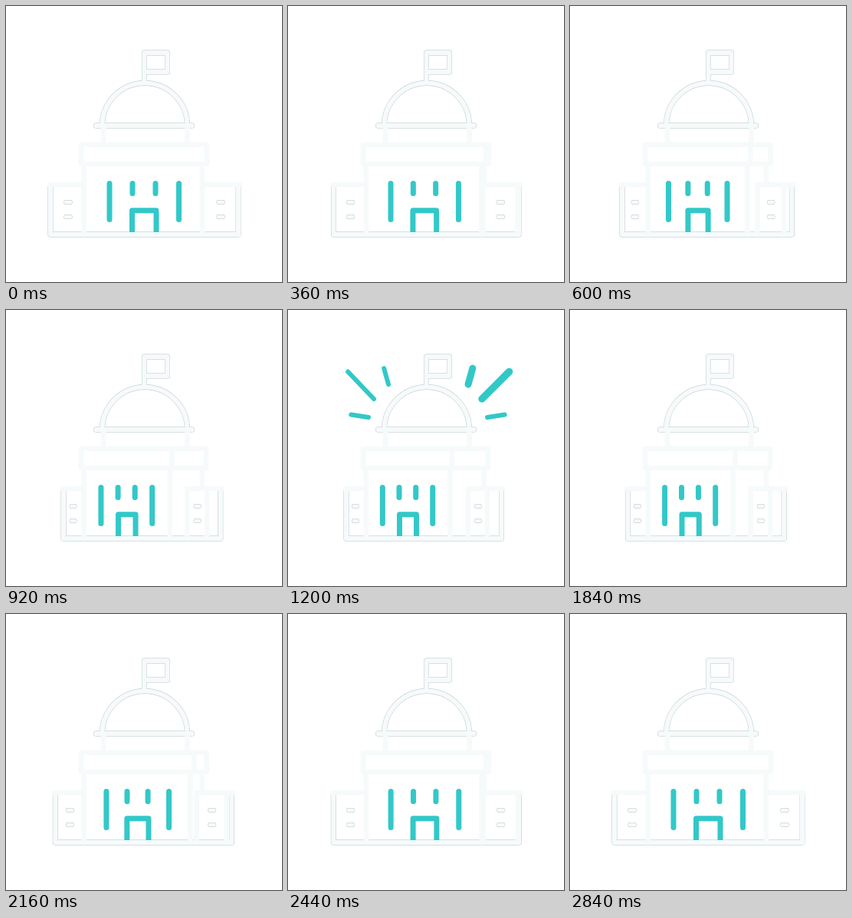
Write an HTML page with a canvas that moves like this. It is 360 px wide and 360 px high and loops after 3 s.

```html
<!DOCTYPE html>
<html lang="en">
<head>
<meta charset="utf-8">
<title>Turning capitol</title>
<style>
html, body { margin: 0; width: 100%; height: 100%; overflow: hidden; background: #fff; }
canvas { display: block; width: 100vmin; height: 100vmin; }
</style>
</head>
<body>
<canvas id="stage" width="360" height="360"></canvas>
<script>
const ctx = document.getElementById('stage').getContext('2d');
const LOOP = 3000;
const TEAL = '#33c8c8';
const PALE = '#f6fafb';
const EDGE = '#b4c0c4';
const BASE = 298;

const clamp = v => Math.max(0, Math.min(1, v));
const mix = (a, b, k) => a + (b - a) * k;
const progress = (t, start, end) => clamp((t - start) / (end - start));
const smooth = u => u * u * (3 - 2 * u);

// Bezier timing with flat ends: control points (x1, 0) and (x2, 1).
function ease(u, x1, x2) {
  let lo = 0, hi = 1;
  for (let i = 0; i < 22; i++) {
    const s = (lo + hi) / 2, r = 1 - s;
    if (3 * r * r * s * x1 + 3 * r * s * s * x2 + s ** 3 < u) lo = s;
    else hi = s;
  }
  return smooth((lo + hi) / 2);
}

function polyline(...points) {
  const path = new Path2D();
  points.forEach(([x, y], i) => i ? path.lineTo(x, y) : path.moveTo(x, y));
  return path;
}

function stroke(path, color, width, cap = 'round') {
  ctx.strokeStyle = color;
  ctx.lineWidth = width;
  ctx.lineCap = cap;
  ctx.lineJoin = 'round';
  ctx.stroke(path);
}

const dome = new Path2D();
dome.arc(181, 156, 55.5, Math.PI, 0);

function drawOutline(p) {
  const edged = new Path2D();
  const plain = new Path2D();
  const line = (path, ...points) => path.addPath(polyline(...points));
  const column = (x, top, bottom) => line(plain, [x, top], [x, bottom]);

  // Flag, dome and drum
  line(edged, [180.5, 100], [180.5, 61], [210.5, 61], [210.5, 86], [180.5, 86]);
  edged.addPath(dome);
  line(edged, [117.5, 156], [242.5, 156]);
  column(127, 156, 181);
  column(236.5, 156, 181);

  // Lintel and main body
  const lintelRight = mix(262, 261, p);
  line(plain, [98, 181], [lintelRight, 181], [lintelRight, 206], [98, 206], [98, 181]);
  column(mix(262, 214, p), 181, 206);
  column(102, 206, BASE);
  column(mix(256, 211.5, p), 206, BASE);
  column(256, 206, 233);

  // Wings
  const left = mix(58, 76, p);
  const inner = mix(256, 235, p);
  const far = mix(303, 278.5, p);
  line(plain, [left - 1, 233], [100, 233]);
  line(plain, [inner, 233], [far + 2, 233]);
  line(edged, [left, 235], [left, BASE], [far, BASE], [far, 235]);
  column(inner, 233, BASE);
  column(mix(303, 260, p), 233, BASE);

  stroke(edged, EDGE, 7);
  stroke(plain, PALE, 6.6);
  stroke(edged, PALE, 6.2);

  for (const y of [256, 275]) {
    for (const x of [mix(81, 88, p), mix(280, 248, p)]) {
      const half = mix(2.8, 2, p);
      const dash = polyline([x - half, y], [x + half, y]);
      stroke(dash, EDGE, 5.8);
      stroke(dash, PALE, 5);
    }
  }
}

function drawOpenings(p) {
  const doorLeft = mix(164.5, 145.5, p), doorRight = mix(196, 167.5, p);
  stroke(polyline([doorLeft, 295], [doorLeft, 266.7], [doorRight, 266.7], [doorRight, 295]), TEAL, 7, 'butt');
  const windows = [[135, 123.3, 278.5], [165, 145, 244.5], [195, 166.7, 244.5], [225.5, 188.7, 278.5]];
  for (const [from, to, bottom] of windows) {
    const x = mix(from, to, p);
    stroke(polyline([x, 231.5], [x, bottom]), TEAL, 7);
  }
}

// Each ray: inner x, inner y, outer x, outer y, width.
const rays = [
  [112, 116, 54, 55, 6],
  [131, 97, 121, 61, 6],
  [105, 140, 66, 134, 6],
  [253, 116, 314, 55, 9.5],
  [235, 97, 245, 61, 9],
  [260, 140, 299, 134, 6]
];

function drawRays(t) {
  const head = smooth(progress(t, 940, 1410));
  const tail = smooth(progress(t, 1220, 1800));
  if (head <= tail) return;
  for (const [x0, y0, x1, y1, width] of rays) {
    const at = k => [mix(x0, x1, k), mix(y0, y1, k)];
    stroke(polyline(at(tail), at(head)), TEAL, width);
  }
}

function draw(t) {
  const turn = t < 1500
    ? ease(progress(t, 120, 1200), 0.55, 0.25)
    : 1 - ease(progress(t, 1753, 2779), 0.33, 0.2);
  ctx.fillStyle = '#fff';
  ctx.fillRect(0, 0, 360, 360);
  drawOutline(turn);
  drawOpenings(turn);
  drawRays(t);
}

const startTime = performance.now();
function tick() {
  draw((performance.now() - startTime) % LOOP);
  requestAnimationFrame(tick);
}
tick();
</script>
</body>
</html>
```
